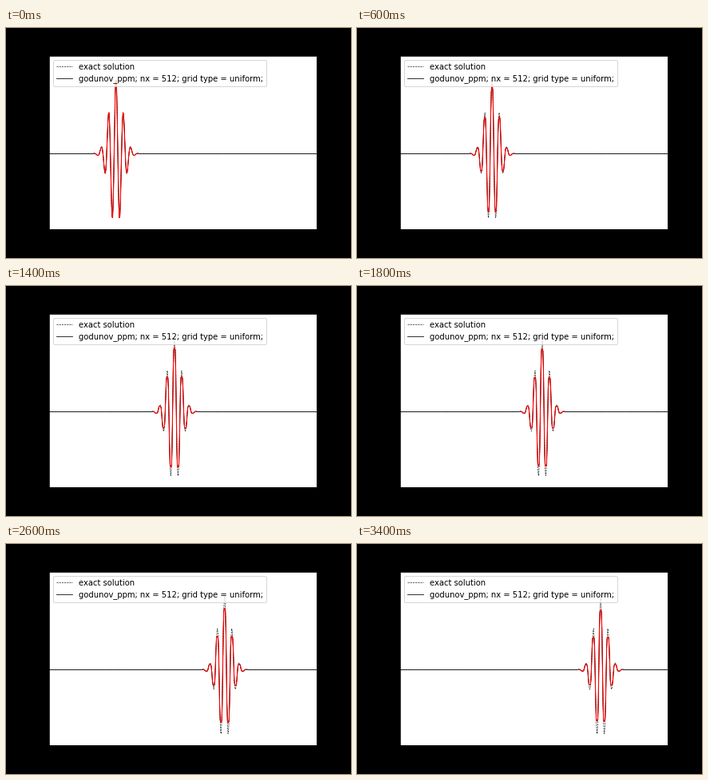
These frames come from a looping animation (432 px wide and 288 px high, 3600 ms). A matplotlib script:

```python
import numpy as np
import matplotlib.pyplot as plt
from matplotlib.animation import FuncAnimation

FRAMES, INTERVAL = 18, 200
CELLS = 512
CFL = 0.8
STEPS_PER_FRAME = 20
LAST_STEP = 320

x = (np.arange(CELLS) + 0.5) / CELLS


def packet(x, center):
    d = x - center
    return np.exp(-800 * d**2) * np.cos(2 * np.pi * 36 * d)


def ppm_step(u):
    """Advance one time step with the piecewise parabolic method."""
    prev, nxt = np.roll(u, 1), np.roll(u, -1)
    back, fwd = u - prev, nxt - u
    slope = np.minimum(abs(back + fwd) / 2, 2 * np.minimum(abs(back), abs(fwd)))
    slope = np.where(back * fwd > 0, np.sign(fwd) * slope, 0)

    right = u + fwd / 2 - (np.roll(slope, -1) - slope) / 6
    left = np.roll(right, 1)
    flat = (right - u) * (u - left) <= 0
    jump, mid = right - left, u - (left + right) / 2
    steep_l = jump * mid > jump**2 / 6
    steep_r = jump * mid < -jump**2 / 6
    new_left = np.where(flat, u, np.where(steep_l, 3 * u - 2 * right, left))
    new_right = np.where(flat, u, np.where(steep_r, 3 * u - 2 * left, right))

    curve = 6 * u - 3 * (new_left + new_right)
    flux = new_right - CFL / 2 * (
        new_right - new_left - (1 - 2 * CFL / 3) * curve)
    return u - CFL * (flux - np.roll(flux, 1))


def step_of(frame):
    # The run stops just short of the end time, then lands on it.
    if frame == FRAMES - 1:
        return LAST_STEP
    return min(frame * STEPS_PER_FRAME, LAST_STEP - 1)


history = [packet(x, 0.25)]
for _ in range(LAST_STEP):
    history.append(ppm_step(history[-1]))

fig = plt.figure(figsize=(6, 4), dpi=72, facecolor="black")
fig.subplots_adjust(left=0.125, right=0.9, bottom=0.125, top=0.88)
ax = fig.add_subplot(xlim=(0, 1), ylim=(-1, 1.3), xticks=[], yticks=[])

exact, = ax.plot([], [], "k--", lw=0.6, label="exact solution")
solved, = ax.plot([], [], "k-", lw=0.8,
                  label="godunov_ppm; nx = 512; grid type = uniform;")
active, = ax.plot([], [], "r-", lw=1.1)
ax.legend(loc="upper left", fontsize=10)


def draw(frame):
    step = step_of(frame)
    center = 0.25 + step * CFL / CELLS
    u = history[step]
    exact.set_data(x, packet(x, center))
    solved.set_data(x, u)
    active.set_data(x, np.where(abs(x - center) < 0.083, u, np.nan))
    return exact, solved, active


anim = FuncAnimation(fig, draw, frames=FRAMES, interval=INTERVAL,
                     repeat=True, repeat_delay=0)
plt.show()
```
